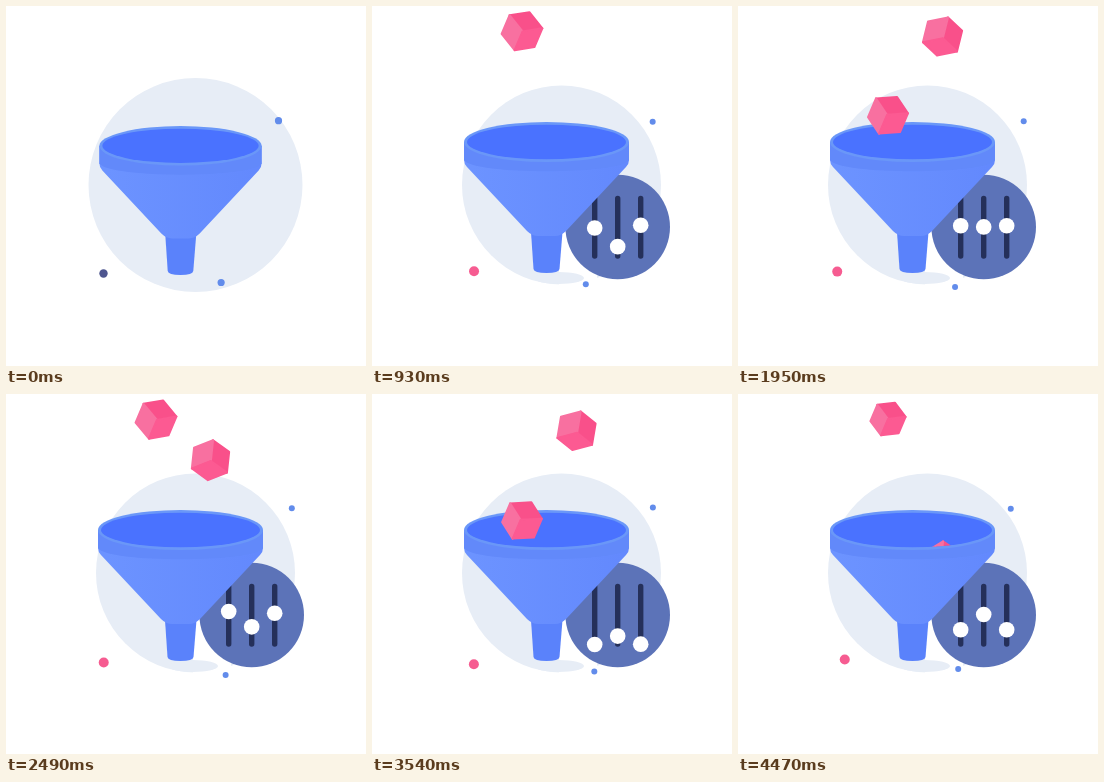
An HTML page with a canvas that plays this animation: 360x360 px, repeating every 4.5 s.

```html
<!DOCTYPE html>
<html>
<head>
<meta charset="utf-8">
<style>
  html, body { margin: 0; width: 100%; height: 100%; overflow: hidden; background: #fff; }
  canvas { display: block; }
</style>
</head>
<body>
<canvas id="stage" width="360" height="360"></canvas>
<script>
const ctx = document.getElementById('stage').getContext('2d');
const LOOP = 4500;

const clamp = x => Math.max(0, Math.min(1, x));
const smooth = x => (x = clamp(x), x * x * (3 - 2 * x));
const mix = (a, b, k) => a + (b - a) * k;
const blend = (a, b, k) => `rgb(${a.map((v, i) => Math.round(mix(v, b[i], k)))})`;
const wave = (t, period) => Math.sin(2 * Math.PI * t / period);
const swing = (t, period) => Math.cos(2 * Math.PI * t / period);

function ellipse(x, y, rx, ry, color) {
  ctx.beginPath();
  ctx.ellipse(x, y, rx, ry, 0, 0, 7);
  ctx.fillStyle = color;
  ctx.fill();
}
const dot = (x, y, r, color) => ellipse(x, y, r, r, color);

function shape(path, color) {
  ctx.fillStyle = color;
  ctx.fill(new Path2D(path));
}

// Outer knobs sink slowly with a fading wobble, the middle one bobs.
function knobHeights(u) {
  const sink = -27 * swing(u, 6000);
  const wobble = wave(u, 2900) * clamp(1 - u / 4000);
  return [sink + 36 * wobble, 12.5 + 13 * swing(u, 2670), sink + 32 * wobble];
}

function drawSliders(t) {
  const scale = t < 510 ? 1.1 * smooth((t - 250) / 260) : mix(1.1, 1, smooth((t - 530) / 230));
  if (!scale) return;
  // Pale gap between the neck and the disc, with the floor shadow in it.
  shape('M187 222H225V280H187Z', '#fff');
  ellipse(187, 272, 25, 6, '#e7edf6');
  ctx.save();
  ctx.translate(245.7, 221);
  ctx.scale(scale, scale);
  dot(0, 0, 52.3, '#5c73b8');
  ctx.strokeStyle = '#25305a';
  ctx.lineWidth = 5.4;
  ctx.lineCap = 'round';
  knobHeights(Math.max(0, t - 510)).forEach((y, i) => {
    const x = (i - 1) * 23;
    ctx.beginPath();
    ctx.moveTo(x, -28.5);
    ctx.lineTo(x, 29);
    ctx.stroke();
    dot(x, y, 7.8, '#fff');
  });
  ctx.restore();
}

// Three visible faces spanned by the edges leaving the nearest corner.
function drawCube(x, y, edge, yaw, roll) {
  const c = Math.cos(yaw) * edge, s = Math.sin(yaw) * edge;
  const down = [0, .816 * edge], right = [c, -.577 * s], left = [-s, -.577 * c];
  const near = [0, 1].map(i => -(down[i] + right[i] + left[i]) / 2);
  ctx.save();
  ctx.translate(x, y);
  ctx.rotate(roll);
  ctx.lineWidth = 2;
  ctx.lineJoin = 'round';
  for (const [p, q, color] of [[right, left, '#f9508a'], [left, down, '#f870a0'], [down, right, '#fc5a92']]) {
    ctx.beginPath();
    for (const [a, b] of [[0, 0], [1, 0], [1, 1], [0, 1]])
      ctx.lineTo(near[0] + a * p[0] + b * q[0], near[1] + a * p[1] + b * q[1]);
    ctx.closePath();
    ctx.fillStyle = ctx.strokeStyle = color;
    ctx.fill();
    ctx.stroke();
  }
  ctx.restore();
}

// Cubes pop up in turn on the left and right, then fall into the funnel.
function drawCubes(t) {
  ctx.save();
  ctx.beginPath();
  ctx.rect(0, 0, 360, 136);
  ctx.ellipse(174.5, 136, 79.5, 17.3, 0, 0, Math.PI);
  ctx.clip();
  [847, 1685, 2350, 3100, 4470].forEach((start, i) => {
    const u = t - start;
    if (u < -200 || u > 1550) return;
    const onRight = i % 2;
    const top = onRight ? 28 : 25;
    const fall = Math.max(0, u) / 1370;
    const roll = onRight ? 1.45 - .43 * fall : .4;
    drawCube(onRight ? 204.5 : 150, top + (168 - top) * fall ** 2.45,
      25 * smooth((u + 200) / 260), .785 + .12 * Math.sin(u / 300), roll);
  });
  ctx.restore();
}

function drawFunnel(k) {
  ctx.save();
  ctx.translate(174.5, 267 + 2 * k);
  ctx.scale(1 - .017 * k, 1 - .014 * k);
  ctx.translate(-174.5, -267);
  shape('M159 226H190.5L187.5 263Q187 267 174.5 267T161.5 263Z', '#5a82fb');
  const cone = ctx.createLinearGradient(100, 0, 250, 0);
  cone.addColorStop(0, '#6c93ff');
  cone.addColorStop(1, '#6389fd');
  shape('M92 136V154Q92 158 95 161L155 225Q160 230 166 230H183Q189 230 194 225L254 161Q257 158 257 154V136Z', cone);
  shape('M92 136V154C100 169 249 169 257 154V136Z', '#6289fa');
  ellipse(174.5, 136, 82.5, 20, '#6a97f8');
  ellipse(174.5, 136, 79.5, 17.3, '#4a72ff');
  ctx.restore();
}

function drawDots(t) {
  const s = t / LOOP, arc = Math.sin(Math.PI * s);
  const r = mix(3.6, 3, smooth(t / 400));
  dot(272.5 + 13.5 * arc, 114.7 + 1.2 * wave(t, LOOP), r, '#628ceb');
  dot(218 - 4.3 * swing(t - 750, 5600), 276.5 - 1.5 * s + 5.5 * arc * arc, r, '#628ceb');
  dot(97.5 + 6 * s + 3.3 * wave(t, 3600), 267.5 - 3.3 * wave(Math.max(0, t - 500), 3600),
    mix(4.2, 5, smooth(t / 400)), blend([78, 86, 143], [246, 92, 145], smooth((t - 530) / 350)));
}

function draw(t) {
  const squash = 1 - smooth(t / 400);
  ctx.clearRect(0, 0, 360, 360);
  dot(189.5, 179, 99.5 + 7.5 * squash, '#e7edf6');
  drawSliders(t);
  drawFunnel(squash);
  drawCubes(t);
  drawDots(t);
}

const begin = performance.now();
function tick() {
  draw((performance.now() - begin) % LOOP);
  requestAnimationFrame(tick);
}
tick();
</script>
</body>
</html>
```
